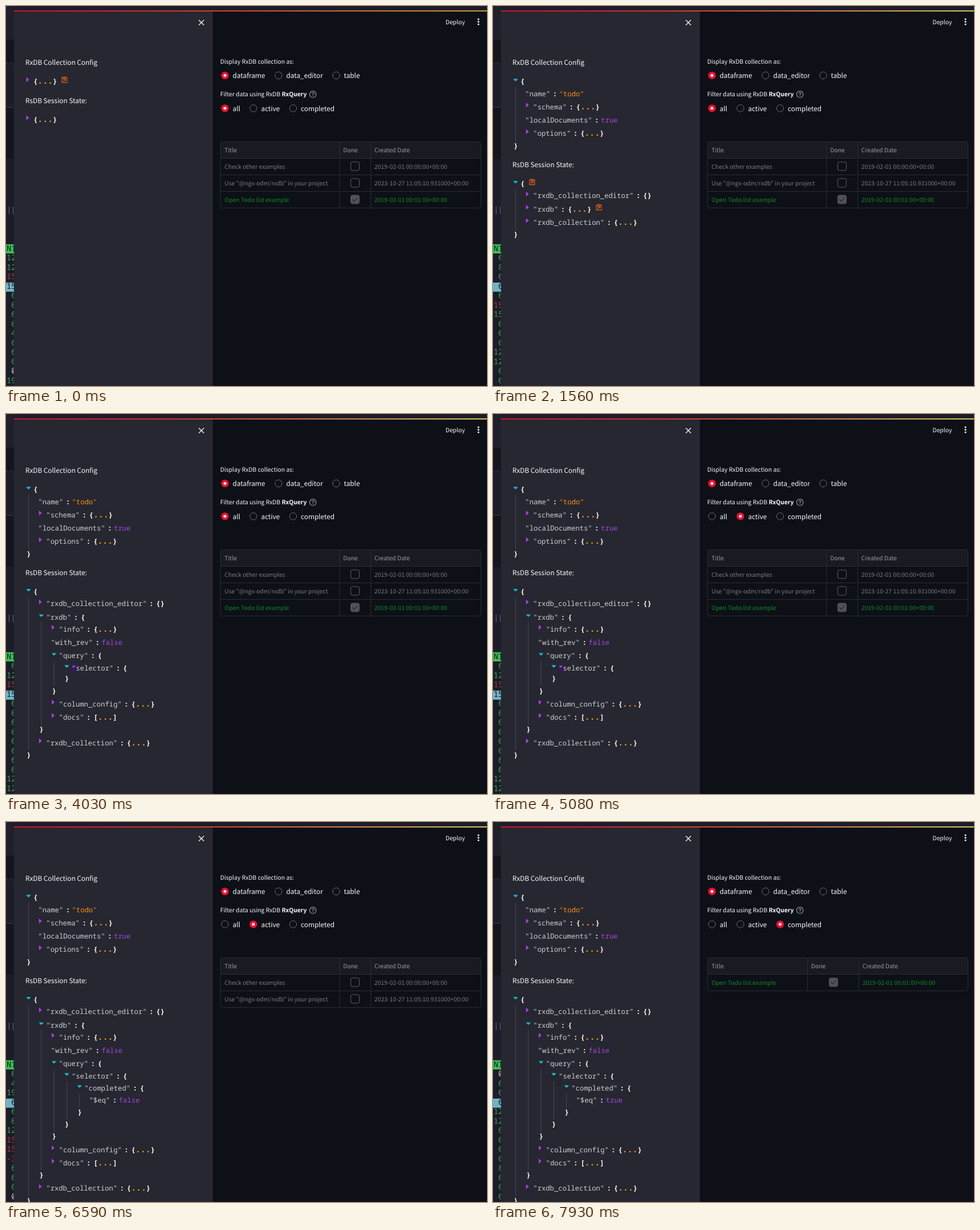
Animation, 842 px wide and 665 px high, one loop 8000 ms. Source, as an HTML page:

```html
<!DOCTYPE html>
<html lang="en">
<head>
<meta charset="utf-8">
<title>RxDB todo state</title>
<style>
  html, body { margin: 0; width: 100%; height: 100%; overflow: hidden; background: #0d1017; }
  svg { display: block; width: 100%; height: 100%; }
  text {
    font: 10.36px "Noto Sans CJK JP", "Noto Sans CJK SC", "Noto Sans", sans-serif;
    fill: #fafafa; text-rendering: geometricPrecision; white-space: pre;
  }
  .large { font-size: 11.8px; }
  .bold { font-weight: 700; }
  .head { fill: #9b9ca1; }
  .cell { fill: #797a7e; }
  .done { fill: #0b8a26; }
  .json, .term { font-family: "Noto Sans Mono", "DejaVu Sans Mono", monospace; }
  .json { font-size: 12.22px; fill: #cfcfd4; }
  .brace { font-weight: 700; fill: #f8f8f2; }
  .dots { font-size: 14.8px; font-weight: 700; fill: #f09a18; }
  .string { fill: #fb8f14; }
  .bool { fill: #a246e2; }
  .term { font-size: 13.8px; }
</style>
</head>
<body>
<svg id="stage" viewBox="0 0 842 665" preserveAspectRatio="none"></svg>
<script>
const LOOP = 8000;
const CHAR = 7.332, DOT = 8.88, INDENT = 22.3;
const NEST = 21.18, SIBLING = 23.28, EMPTY = 18.8;
const COLON_GAP = 4.5;

// When the clipboard icon of each tree entry is visible, in ms.
const ICON_TIMES = {
  config: [[0, 710]],
  schema: [[540, 710]],
  session: [[860, 4030]],
  rxdb_collection_editor: [[1390, 1560]],
  rxdb: [[1560, 4030], [5350, 6590]],
  info: [[2280, 2610]],
  query: [[2610, 4030], [5350, 6590]],
  selector: [[3320, 4030], [5350, 6590]],
  completed: [[5520, 6590]],
  $eq: [[6240, 6590]]
};

// Terminal column behind the window; r = red, w = white.
const TERMINAL = [
  [0, '12 12 15r 15 6 6 6 6 4 6 6 6 0w 19'],
  [860, '6 8 6 6 6 15r 15 6 6 6 12 12 6 6'],
  [4030, '6 12 15r 15 6 6 6 6 6 6 6 6 12 12'],
  [5520, '6 4 19 6 6 6 12 15r 15r -3r 6 6 6 0w'],
  [7040, '0w 6 6 6 12 12 6 6 6 6 8 6 6 6']
];

const TODOS = [
  { title: 'Check other examples', date: '2019-02-01 00:00:00+00:00' },
  { title: 'Use "@ngx-odm/rxdb" in your project', date: '2023-10-27 11:05:10.931000+00:00' },
  { title: 'Open Todo list example', date: '2019-02-01 00:01:00+00:00', done: true }
];

const latest = (steps, t) => steps.filter(([start]) => t >= start).pop()[1];
const text = (x, y, body, cls = '') => `<text x="${x}" y="${y}" class="${cls}">${body}</text>`;
const span = (body, cls, dx = 0) => `<tspan dx="${dx}" class="${cls}">${body}</tspan>`;
const rect = (x, y, w, h, fill, extra = '') =>
  `<rect x="${x}" y="${y}" width="${w}" height="${h}" fill="${fill}" ${extra}/>`;
const path = (d, stroke, width = 1) =>
  `<path d="${d}" fill="none" stroke="${stroke}" stroke-width="${width}"/>`;
const disc = (x, y, r, fill, extra = '') => `<circle cx="${x}" cy="${y}" r="${r}" fill="${fill}" ${extra}/>`;

function backdrop(t) {
  const rows = latest(TERMINAL, t).split(' ').map((entry, i) => {
    const value = entry.replace(/[rw]/, '');
    const color = i === 3 ? '#10151c' : /r/.test(entry) ? '#b23a48' : /w/.test(entry) ? '#c5c8c6' : '#35a853';
    return `<text class="term" x="${1 + 8.28 * (2 - value.length)}" y="${Math.round(445 + 16.54 * i)}"
      style="fill:${color}">${value}</text>`;
  }).join('');
  return rect(0, 0, 842, 665, '#1c1d29') + rect(0, 0, 14, 59, '#1f202b') +
    rect(0, 59, 14, 40, '#14151d') + rect(0, 178, 14, 90, '#14151d') +
    path('M0 99.5H4M7 99.5H11M0 177.5H14', '#3a3b46') +
    path('M5.5 351V364M12.5 351V364', '#6d6590') +
    rect(0, 417, 14, 16, '#3cbf56') + `<text class="term" x="1" y="429" style="fill:#10151c">N1</text>` +
    rect(0, 484, 14, 16, '#70b3c6') + rows;
}

function frame(t) {
  const end = t < 90 ? '#f3bd3c' : '#fff173';
  return `<defs><linearGradient id="bar">
      <stop offset="0" stop-color="#f5102d"/><stop offset=".35" stop-color="#fb3a35"/>
      <stop offset="1" stop-color="${end}"/></linearGradient></defs>` +
    rect(14, 8, 348, 657, '#262730') + rect(362, 8, 480, 657, '#0d1017') +
    rect(14, 7.8, 828, 1.65, 'url(#bar)') +
    path('M337.5 24.5L346.5 33.5M346.5 24.5L337.5 33.5', '#fafafa', 1.4) +
    text(769.5, 32, 'Deploy') + [23, 27.5, 32].map(y => disc(827, y, 1.55, '#fafafa')).join('');
}

const icon = (x, y) => `<g transform="translate(${x} ${y - 9.2})">` +
  path('M2.5 2H1V10.6H9.8V7.6M8.2 2H9.8V4.6M3 3.4V1.6H4.2Q5.4-.6 6.6 1.6H7.8V3.4Z', '#e65c17', 1.2) +
  path('M11 6.1H5M7 4.2L5 6.1L7 8M2.6 5H4.4M2.6 8.4H4.6', '#e65c17', 1.1) + '</g>';

function arrow(x, y, open) {
  const shape = open ? `M${x} ${y - 5}h8.6l-4.3 4.6z` : `M${x + .3} ${y - 7.8}v8.6l4.8-4.3z`;
  return `<path d="${shape}" fill="${open ? '#12bfdc' : '#b13df4'}"/>`;
}

// Draws an entry and its children at height y; returns the markup and the last row's height.
function entry(node, depth, y, t) {
  const { id, key = id, value, kids = [], open, ends = '{}' } = node;
  const leaf = value !== undefined;
  const left = INDENT * depth;
  const x = left + (leaf ? 34 : 48);
  const gap = !key ? 0 : leaf ? 3.4 : 4.77;
  const keyWidth = key ? (key.length + 3) * CHAR + COLON_GAP + gap : 0;
  let body = key ? `"${key}"` + span(':', 'brace', COLON_GAP) : '';
  let width = 2 * CHAR;

  if (leaf) {
    body += span(value, value[0] === '"' ? 'string' : 'bool', gap);
    width = value.length * CHAR - 4.2;
  } else if (open) {
    body += span(ends[0], 'brace', gap);
    width = CHAR;
  } else {
    body += span(ends[0], 'brace', gap) + (kids.length ? span('...', 'dots') : '') + span(ends[1], 'brace');
    if (kids.length) width += 3 * DOT;
  }

  let out = text(x, Math.round(y + 4), body, 'json');
  if (!leaf) out += arrow(left + 35.2, y, open);
  if ((ICON_TIMES[id] || []).some(([from, to]) => t >= from && t < to)) {
    out += icon(x + keyWidth + width + 7.8, y);
  }
  if (!open) return [out, y];

  const top = y;
  kids.forEach((kid, i) => {
    const [markup, bottom] = entry(kid, depth + 1, y + (i ? SIBLING : NEST), t);
    out += markup;
    y = bottom;
  });
  y += kids.length ? NEST : EMPTY;
  out += path(`M${left + 39.5} ${top + 9}V${y - 8}`, '#484952') +
    text(left + 36.2, Math.round(y + 4), ends[1], 'json brace');
  return [out, y];
}

function sidebar(t) {
  const folded = (id, ends) => ({ id, kids: [{}], ends });
  const config = {
    id: 'config', key: '', open: t >= 90, kids: [
      { id: 'name', value: '"todo"' }, folded('schema'),
      { id: 'localDocuments', value: 'true' }, folded('options')
    ]
  };
  const completed = {
    id: 'completed', open: t >= 5970, kids: [{ id: '$eq', value: t < 7750 ? 'false' : 'true' }]
  };
  const selector = { id: 'selector', open: t >= 3580, kids: t < 5090 ? [] : [completed] };
  const rxdb = {
    id: 'rxdb', open: t >= 2010, kids: [
      folded('info'), { id: 'with_rev', value: 'false' },
      { id: 'query', open: t >= 3050, kids: [selector] },
      folded('column_config'), folded('docs', '[]')
    ]
  };
  const session = {
    id: 'session', key: '', open: t >= 1210,
    kids: [{ id: 'rxdb_collection_editor' }, rxdb, folded('rxdb_collection')]
  };

  const [configMarkup, bottom] = entry(config, 0, 132.4, t);
  const [sessionMarkup] = entry(session, 0, bottom + 66.6, t);
  const selection = t >= 3670 && t < 5090 ? rect(115, 437, 7.6, 15, '#3b1563') : '';
  return text(34, 103, 'RxDB Collection Config', 'large') + configMarkup +
    text(34, Math.round(bottom + 37.2), 'RsDB Session State:', 'large') + selection + sessionMarkup;
}

function radios(y, options, selected, hovered) {
  return options.map(([x, label], i) => {
    const mark = i === selected
      ? disc(x, y, 6.6, '#ff0a2e') + disc(x, y, 2.5, '#fff')
      : disc(x, y, 6.2, i === hovered ? '#262730' : '#0d1017', 'stroke="#6c6d73"');
    return mark + text(x + 13.5, y + 4.5, label, 'large');
  }).join('');
}

function table(todos, doneX, dateX) {
  const bottom = 266.5 + 29 * todos.length;
  const line = '#2a2c34';
  let out = rect(375.5, 237.5, 456, bottom - 237.5, '#0d1017', 'rx="4"') +
    rect(376, 238, 455, 28.5, '#191b23', 'rx="3"');
  [['Title', 382.5], ['Done', doneX + 6.3], ['Created Date', dateX + 6.3]]
    .forEach(([label, x]) => { out += text(x, 256, label, 'head'); });
  todos.forEach(({ title, date, done }, i) => {
    const y = 281 + 29 * i;
    const cls = done ? 'done' : 'cell';
    const x = Math.round((doneX + dateX) / 2) - 8;
    out += path(`M375.5 ${y - 14.5}H831.5`, line) +
      text(382.5, y + 4, title, cls) + text(dateX + 6.3, y + 4, date, cls) +
      rect(x + .5, y - 8, 15, 15, done ? '#515257' : 'none', `rx="3" stroke="${done ? '#515257' : '#5d5e64'}"`);
    if (done) out += path(`M${x + 3.5} ${y - .5}l3 3.2l6-6.4`, '#24262d', 1.2);
  });
  return out + path(`M${doneX} 237.5V${bottom}M${dateX} 237.5V${bottom}`, line) +
    rect(375.5, 237.5, 456, bottom - 237.5, 'none', `rx="4" stroke="${line}"`);
}

function main(t) {
  const filter = latest([[0, 0], [4910, 1], [7570, 2]], t);
  const hovered = latest([[0, -1], [4740, 1], [5350, -1], [7310, 2]], t);
  const shown = latest([[0, 0], [5090, 1], [7750, 2]], t);
  const todos = TODOS.filter(todo => !shown || !!todo.done === (shown === 2));
  return text(375, 101, 'Display RxDB collection as:') +
    radios(121.5, [[383.3, 'dataframe'], [477, 'data_editor'], [578, 'table']], 0) +
    text(375, 158, 'Filter data using RxDB ' + span('RxQuery', 'bold')) +
    disc(537.3, 154.5, 5.7, 'none', 'stroke="#a3a4a9" stroke-width="1.1"') +
    path('M535.4 153.2Q535.6 151.5 537.3 151.5Q539.2 151.5 539.2 153.1Q539.2 154.1 537.3 155.1V156M537.3 156.9V158', '#a3a4a9', 1.1) +
    radios(179, [[383.3, 'all'], [433, 'active'], [502.6, 'completed']], filter, hovered) +
    (shown === 2 ? table(todos, 550.5, 640.5) : table(todos, 584, 638.5));
}

const stage = document.getElementById('stage');
const start = performance.now();
let shownMarkup = '';

function draw(now) {
  const t = Math.max(0, now - start) % LOOP;
  const markup = backdrop(t) + frame(t) + sidebar(t) + main(t);
  if (markup !== shownMarkup) stage.innerHTML = shownMarkup = markup;
  requestAnimationFrame(draw);
}
draw(start);
</script>
</body>
</html>
```
